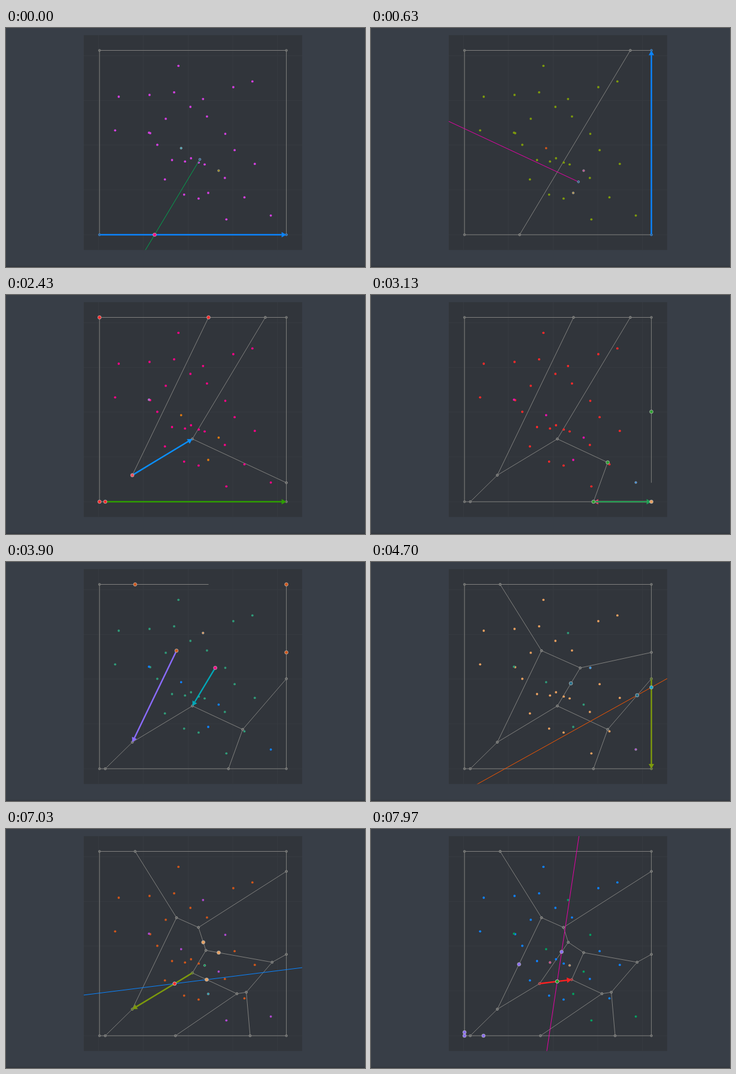
An HTML page that plays this animation: 600x400 px, repeating every 8000 ms.

```html
<!DOCTYPE html>
<html lang="en">
<head>
<meta charset="utf-8">
<title>Incremental Voronoi diagram</title>
<style>
html, body { margin: 0; width: 100%; height: 100%; overflow: hidden; background: #383e47; }
svg { display: block; width: 100vw; height: 100vh; }
</style>
</head>
<body>
<svg viewBox="0 0 600 400">
  <defs><clipPath id="clip"><rect x="130" y="12" width="365" height="359.5"/></clipPath></defs>
  <rect y="398" width="600" height="2" fill="#32373f"/>
  <rect x="130" y="12" width="365" height="359.5" fill="#31353b"/>
  <path d="M154.5 12V371M229.5 12V371M304.5 12V371M379 12V371M453.5 12V371M130 46.5H495M130 121.5H495M130 196H495M130 271H495M130 346H495" stroke="#363a40" fill="none"/>
  <g id="scene"></g>
</svg>
<script>
const LOOP = 8000;
const pt = ([x, y]) => ({ x, y });

// Sites in insertion order, then those still waiting.
const sites = [
  [292.7, 201.1], [355.4, 238.7], [338, 276], [239, 175.2], [442.6, 313.8],
  [329.3, 118.8], [366.5, 177.1], [368.3, 320.3], [332, 228.3], [299.2, 223.4]
].map(pt);
const waiting = [
  [288.2, 63.3], [411.8, 89.4], [379.9, 99], [188.4, 115], [239.9, 112], [281, 107.7],
  [308.2, 132], [335.9, 148.1], [267, 151.9], [182.4, 171.3], [241, 176], [252.9, 195.5],
  [382.1, 204.4], [415.8, 227.4], [277.5, 221], [309.2, 218], [322.1, 225.2],
  [265.6, 253.4], [365.8, 250.9], [297.7, 278.8], [321.9, 285.4], [398.5, 283.4]
].map(pt);
const box = [[156.3, 346], [468.6, 346], [468.6, 37.5], [156.3, 37.5]].map(pt);

// One entry per inserted site: start time, anchored event and its time, colours.
const look = (pend, done, cur, near, line, a1, a2, vert, hot) =>
  ({ pend, done, cur, near, line, a1, a2, vert, hot });
const steps = [
  { t: 0, key: 'w0.0', at: 0, c: look('#d33fe0', '#d0561a', '#a08a18', '#45a8b8', '#00a550', '#0a84ff', '#ff5500', '#5a9ad0', '#ff0088') },
  { t: 550, key: 'f0', at: 1230, c: look('#7d9a0c', '#d0561a', '#b8954a', '#c04a90', '#e800a8', '#0a84ff', '#00a550', '#1aa5b8', '#8b6cff') },
  { t: 1690, key: 'f4', at: 2430, c: look('#ff0088', '#e07a10', '#d040e0', '#2f9a78', '#00a8b8', '#2e9e00', '#0a90ff', '#ff2a2a', '#f2505e') },
  { t: 2560, key: 'f1', at: 3130, c: look('#ff2a2a', '#f010b0', '#3a8fe0', '#9a8a10', '#7d9a0c', '#1fa055', '#f04070', '#2ea030', '#e8a060') },
  { t: 3270, key: 'f0', at: 3860, c: look('#2f9a78', '#0f82ff', '#e8a060', '#d040e0', '#ff2a2a', '#8b6cff', '#00a8b8', '#d0561a', '#ff0088') },
  { t: 4220, key: 'w1.1', at: 4700, c: look('#e8a060', '#2f9a78', '#2196f3', '#b048d0', '#f25500', '#7d9a0c', '#e800a8', '#27708a', '#18a8c8') },
  { t: 5400, key: 'f0', at: 6100, c: look('#0a5a80', '#1f9cf0', '#5a9a50', '#e07a10', '#2e9e00', '#ff5500', '#00a8b8', '#d040e0', '#9a8a10') },
  { t: 6530, key: 'f0', at: 7100, c: look('#d0561a', '#b048d0', '#00a550', '#1aa5b8', '#0a84ff', '#7d9a0c', '#ff0088', '#e8a060', '#ff2a2a') },
  { t: 7400, key: 'w5.0', at: 7970, c: look('#0f82ff', '#00a060', '#e03080', '#c88a50', '#e800a8', '#ff2020', '#00a8b8', '#8a6cf0', '#20a020') },
  { t: 8300 }
];

const dist = (a, b) => Math.hypot(a.x - b.x, a.y - b.y);
const mix = (a, b, t) => ({ x: a.x + (b.x - a.x) * t, y: a.y + (b.y - a.y) * t });
const after = (list, i) => list[(i + 1) % list.length];

// Each polygon vertex keeps in n the neighbour across the edge that leaves it.
function cut(poly, site, other, n) {
  const side = p => dist(p, site) ** 2 - dist(p, other) ** 2;
  const out = [];
  poly.forEach((a, i) => {
    const b = after(poly, i), u = side(a), v = side(b);
    if (u <= 0) out.push(a);
    if ((u <= 0) !== (v <= 0)) out.push({ ...mix(a, b, u / (u - v)), n: u <= 0 ? n : a.n });
  });
  return out;
}
function cell(i, count) {
  let poly = box.map(p => ({ ...p, n: -1 }));
  for (let k = 0; k < count; k++) if (k !== i) poly = cut(poly, sites[i], sites[k], k);
  return poly;
}
const edgeAt = (poly, p) => poly.findIndex((a, i) => {
  const b = after(poly, i);
  return Math.abs(dist(a, p) + dist(p, b) - dist(a, b)) < 1e-4;
});

function build(k) {
  const old = sites.slice(0, k).map((_, i) => cell(i, k));
  const nearest = old.reduce((b, _, i) => dist(sites[i], sites[k]) < dist(sites[b], sites[k]) ? i : b, 0);
  let fresh = cell(k, k + 1);
  const first = fresh.findIndex(v => v.n === nearest);
  fresh = fresh.slice(first).concat(fresh.slice(0, first));
  const events = [];

  fresh.forEach((s, j) => {
    if (s.n < 0) return;
    const e = after(fresh, j), poly = old[s.n], size = poly.length;
    const from = edgeAt(poly, s), to = edgeAt(poly, e);
    let count = 0;
    const walk = (i, back, ray, hot) => {
      const a = poly[i], b = after(poly, i);
      events.push({ label: `w${j}.${count++}`, j, ray, hot, e, s, near: s.n, arrow: back ? [b, a] : [a, b] });
    };
    if (j === 0) {
      for (let i = 0; i <= to; i++) walk(i, false, e, i === to && e);
      for (let n = 0, i = to; n < size; n++) {
        i = (i + 1) % size;
        walk(i, false, s, i === from && s);
        if (i === from) break;
      }
    } else {
      walk(from, false, null, s);
      for (let n = 1, i = from; n < size; n++) {
        i = (i + size - 1) % size;
        walk(i, true, null, i === to && e);
        if (i === to) break;
      }
    }
  });
  fresh.forEach((_, j) => events.push({ label: 'f' + j, fix: true, j }));
  events.push({ label: 'end', fix: true, j: fresh.length });

  // Spread the events on both sides of the anchored one.
  const { t, key, at } = steps[k - 1], end = steps[k].t;
  const mid = Math.max(0, events.findIndex(v => v.label === key));
  events.forEach((v, i) => {
    v.t = i < mid ? t + (at - t) * i / mid : at - 4 + (end - at) * (i - mid) / (events.length - mid);
    v.k = k;
    v.old = old;
    v.fresh = fresh;
  });
  return events;
}
const timeline = sites.slice(1).flatMap((_, i) => build(i + 1));

const f = v => v.toFixed(1);
const dot = (p, r, fill, stroke = 'none', w = .8) =>
  `<circle cx="${f(p.x)}" cy="${f(p.y)}" r="${r}" fill="${fill}" stroke="${stroke}" stroke-width="${w}"/>`;
const seg = (a, b, color = '#80807e', w = 1) =>
  `<path d="M${f(a.x)} ${f(a.y)}L${f(b.x)} ${f(b.y)}" stroke="${color}" stroke-width="${w}"/>`;
const joint = p => dot(p, 1.8, '#666866', '#8a8a88');
const knob = (p, color) => dot(p, 2.9, color, '#b4b8b8');

function arrow(a, b, color) {
  const len = dist(a, b) || 1, ux = (b.x - a.x) / len, uy = (b.y - a.y) / len;
  const m = { x: b.x - ux * 8, y: b.y - uy * 8 };
  const wing = s => `${f(m.x - uy * 4.5 * s)} ${f(m.y + ux * 4.5 * s)}`;
  return seg(a, len > 8 ? m : a, color, 2.4) +
    `<path d="M${f(b.x)} ${f(b.y)}L${wing(1)}L${wing(-1)}Z" fill="${color}"/>`;
}

// Part of a-b lying inside a convex counter-clockwise polygon.
function inside(a, b, poly) {
  let lo = 0, hi = 1;
  poly.forEach((p, i) => {
    const q = after(poly, i);
    const side = v => (q.x - p.x) * (v.y - p.y) - (q.y - p.y) * (v.x - p.x);
    const u = side(a), v = side(b);
    if (u > .01 && v > .01) hi = -1;
    else if (u > .01) lo = Math.max(lo, u / (u - v));
    else if (v > .01) hi = Math.min(hi, u / (u - v));
  });
  return hi - lo > 1e-3 ? [lo, hi] : null;
}

function drawMesh(ev) {
  const { old, fresh, fix, j } = ev;
  const edited = n => n >= 0 && fresh.findIndex(v => v.n === n) <= j && fresh.some(v => v.n === n);
  let lines = '', joints = '';
  old.forEach((poly, i) => poly.forEach((a, m) => {
    const b = after(poly, m);
    const gone = fix && inside(a, b, fresh);
    if (a.n < i) {
      if (!gone) lines += seg(a, b);
      else if (gone[1] - gone[0] < .999) {
        if (edited(i) || edited(a.n)) {
          if (gone[0] > 1e-3) lines += seg(a, mix(a, b, gone[0]));
          if (gone[1] < .999) lines += seg(mix(a, b, gone[1]), b);
        } else lines += seg(a, b);
      }
    }
    if (!fix || dist(a, sites[i]) < dist(a, sites[ev.k])) joints += joint(a);
  }));
  if (fix) for (let n = 0; n < j; n++) lines += seg(fresh[n], after(fresh, n));
  return lines + joints;
}

function drawWalk(ev, c) {
  const p = sites[ev.near], q = sites[ev.k], mid = mix(p, q, .5);
  const reach = target => {
    const d = dist(mid, target) || 1;
    return mix(mid, target, 700 / d);
  };
  let out = '';
  if (ev.ray) out += seg(mid, reach(ev.ray), c.line);
  else {
    const dx = (p.y - q.y) * 30, dy = (q.x - p.x) * 30;
    out += seg({ x: mid.x - dx, y: mid.y - dy }, { x: mid.x + dx, y: mid.y + dy }, c.line);
  }
  out += arrow(...ev.arrow, c.a1);
  out += ev.arrow.map(v => dot(v, 1.6, '#55606a', c.a1)).join('');
  if (ev.ray) out += dot(mid, 1.8, '#3a5a78', '#7ab0dc');
  if (ev.j === 0 && ev.ray === ev.s) out += knob(ev.e, c.vert);
  if (ev.j > 0) for (let n = 0; n <= ev.j; n++) out += knob(ev.fresh[n], c.vert);
  if (ev.hot) out += knob(ev.hot, c.hot);
  return out;
}

function drawFix(ev, c) {
  const { fresh, j } = ev;
  if (j === fresh.length) return fresh.map(v => knob(v, c.vert)).join('');
  const s = fresh[j], e = after(fresh, j);
  let out = '';
  if (s.n < 0) out += arrow(e, s, c.a2) + arrow(s, e, c.a1);
  else {
    const poly = ev.old[s.n];
    const outer = p => {
      const i = edgeAt(poly, p), a = poly[i], b = after(poly, i);
      const gap = v => dist(v, sites[s.n]) - dist(v, sites[ev.k]);
      return gap(a) < gap(b) ? a : b;
    };
    out += arrow(e, outer(e), c.a2) + arrow(s, outer(s), c.a1);
  }
  return out + fresh.map(v => knob(v, v === e ? c.hot : c.vert)).join('');
}

function drawSites(ev, c) {
  const ring = (p, color) => dot(p, 1.8, color, '#a8b0b4', .6);
  return waiting.map(p => dot(p, 1.9, c.pend)).join('') + sites.map((p, i) =>
    i === ev.k ? ring(p, c.cur) :
    i > ev.k ? dot(p, 1.9, c.pend) :
    !ev.fix && i === ev.near ? ring(p, c.near) : dot(p, 1.9, c.done)).join('');
}

const scene = document.getElementById('scene');
scene.setAttribute('clip-path', 'url(#clip)');
let shown = null;
function render(t) {
  let ev = timeline[0];
  for (const v of timeline) if (v.t <= t) ev = v;
  if (ev === shown) return;
  shown = ev;
  const c = steps[ev.k - 1].c;
  scene.innerHTML = drawMesh(ev) + drawSites(ev, c) + (ev.fix ? drawFix : drawWalk)(ev, c);
}

const start = performance.now();
function tick() {
  render((performance.now() - start) % LOOP);
  requestAnimationFrame(tick);
}
tick();
</script>
</body>
</html>
```
